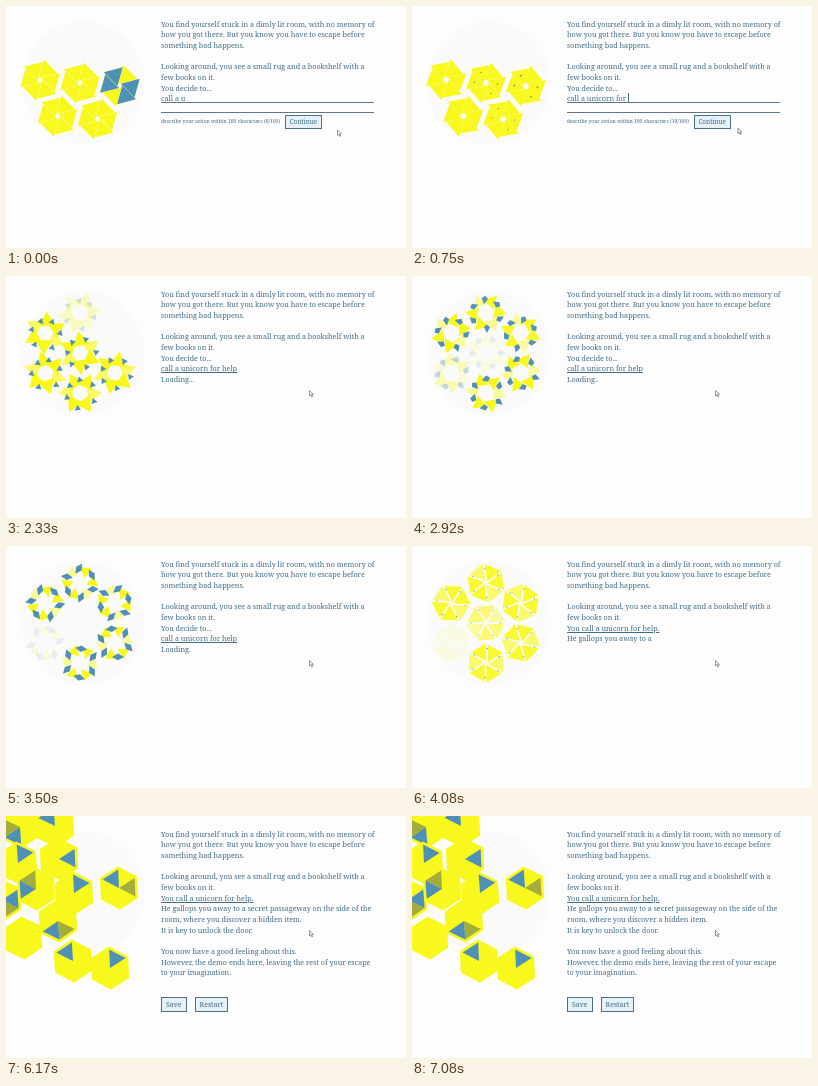
Write an HTML page with a canvas that moves like this. It is 400 px wide and 242 px high and loops after 7160 ms.

```html
<!DOCTYPE html>
<html lang="en">
<head>
<meta charset="utf-8">
<style>
html, body { margin: 0; width: 400px; height: 242px; overflow: hidden; background: #fdfdfd; }
body { position: relative; color: #3f6d88; font: 7.2px/10.65px "Noto Serif", serif; }
body > * { position: absolute; }
canvas { left: 0; top: 0; width: 400px; height: 242px; }
#story { left: 155px; top: 12.7px; white-space: pre; }
.rule { left: 155px; width: 213px; height: 1px; background: #5d7887; }
.row { left: 155px; display: flex; align-items: center; white-space: pre; }
.row span { font-size: 5px; }
.row b { box-sizing: border-box; height: 15px; padding: 0 4px; border: 1px solid #4c7084;
  background: #e5f1f6; font-weight: 400; font-size: 7px; line-height: 13px; }
#go { height: 14px; margin-left: 5px; padding: 0 3.5px; font-size: 6.4px; line-height: 12px; }
#go.over { background: #fdfdfd; }
#caret { border-left: .6px solid #3f6d88; }
</style>
</head>
<body>
<div id="story"></div>
<div class="rule form" style="top:95.5px"></div>
<div class="rule form" style="top:106px"></div>
<div class="row form" style="top:108.5px"><span id="count"></span><b id="go">Continue</b></div>
<div class="row" id="end" style="top:181px;gap:8px"><b>Save</b><b>Restart</b></div>
<canvas></canvas>
<script>
const LOOP = 7160, SENT = 1500, REPLY = 3580, BUTTONS = 6080;
const YELLOW = '#f8f81c', BLUE = '#4f90b6', OLIVE = '#a3ac3c';
const INTRO = `You find yourself stuck in a dimly lit room, with no memory of
how you got there. But you know you have to escape before
something bad happens.

Looking around, you see a small rug and a bookshelf with a
few books on it.
`;
const ACTION = 'call a unicorn for help';
const ECHO = `You ${ACTION}.`;
const ANSWER = `${ECHO}
He gallops you away to a secret passageway on the side of the
room, where you discover a hidden item.
It is key to unlock the door.

You now have a good feeling about this.
However, the demo ends here, leaving the rest of your escape
to your imagination.`;

const $ = s => document.querySelector(s);
const canvas = $('canvas'), g = canvas.getContext('2d');
const dpr = window.devicePixelRatio || 1;
canvas.width = 400 * dpr;
canvas.height = 242 * dpr;

const clamp = x => Math.max(0, Math.min(1, x));
const ease = x => x * x * (3 - 2 * x);
const mix = (a, b, k) => a + (b - a) * k;
const ramp = (t, a, b) => ease(clamp((t - a) / (b - a)));

// Value at time t on a list of [time, value] stops
function key(t, stops, curve = ease) {
  let [t0, v] = stops[0];
  for (const [t1, v1] of stops) {
    if (t < t1) return mix(v, v1, curve(clamp((t - t0) / (t1 - t0))));
    t0 = t1;
    v = v1;
  }
  return v;
}

function poly(points, color) {
  g.beginPath();
  points.forEach(p => g.lineTo(...p));
  g.closePath();
  g.fillStyle = color;
  g.fill();
}

function at(x, y, turn, scale, draw) {
  g.save();
  g.translate(x, y);
  g.rotate(turn);
  g.scale(scale, scale);
  draw();
  g.restore();
}

// Loader made of seven cells, each cut in six turning triangles
const HUB = [74, 77], R = 20, SIXTH = Math.PI / 3;
const TRI = [[-.577 * R, 0], [.289 * R, -.5 * R], [.289 * R, .5 * R]];
const RING_OUT = [[4000, 1], [4400, .12]];
const CELL_ALPHA = [
  [[2330, 1], [3100, 0], [3800, 0], [4300, 1]],
  RING_OUT,
  RING_OUT,
  [[2330, 1], [3200, .12]],
  RING_OUT,
  [[1800, 0], [2330, .25], [3000, 1], ...RING_OUT],
  [[2330, 0], [3000, 1], ...RING_OUT]
];
const TINT_PEAK = [1420, 100, 1420];

function drawLoader(t) {
  const fade = 1 - ramp(t, 4300, 4700);
  if (!fade) return;
  const phi = key(t, [[0, .07], [1420, .09], [2330, .52]]);
  const size = key(t, [[0, .97], [1420, .95], [2330, .85], [3500, .6], [4400, 1]]);
  const twist = key(t, [[0, .2], [1420, .32], [2330, .9], [3500, 1.8], [4400, 2 * SIXTH]]);
  const spread = key(t, [[0, 1.02], [1420, 1], [2330, 1.06], [3500, 1.12], [4400, 1]]);
  const pale = key(t, [[1500, 1], [3000, .45], [3800, .45], [4400, 1]]);
  const chip = key(t, [[1500, 0], [2330, 5.5], [3500, 6], [4300, 0]]);
  const tail = key(t, [[2330, 0], [3500, 1]]);
  CELL_ALPHA.forEach((stops, k) => {
    const alpha = key(t, stops) * fade;
    if (!alpha) return;
    const dist = k ? 40 : 0, dir = phi + SIXTH * (k - 1);
    const peak = TINT_PEAK[k];
    const tint = peak === undefined ? 0 : ease(clamp(1.3 - Math.abs(t - peak) / 600));
    at(HUB[0] + dist * Math.cos(dir), HUB[1] + dist * Math.sin(dir), phi + k * .3 * ramp(t, 1500, 2400), 1, () => {
      for (let i = 0; i < 6; i++) {
        g.globalAlpha = alpha * (i % 3 == 2 ? pale : 1);
        at(0, 0, i * SIXTH, 1, () => at(.577 * R * spread, 0, twist, size, () => {
          poly(TRI, YELLOW);
          if (i % 3 != 2 && tint) at(0, 0, 0, tint, () => poly(TRI, BLUE));
        }));
      }
      g.globalAlpha = alpha;
      if (chip) for (let i = 0; i < 6; i++)
        at(0, 0, (i + .5) * SIXTH, 1, () => at(.72 * R, 0, twist + i, 1, () =>
          poly([[chip, 0], [0, chip * .55], [-chip * tail, 0], [0, -chip * .55]], BLUE)));
    });
  });
}

// Honeycomb: x, y, side with a blue facet, side with an olive facet
const GEMS = [
  [68, 77, 0, -1], [14, 11, 3, 4], [49, 10, 5, -1], [12, 47, 0, -1],
  [53, 43, 1, -1], [30, 73, 4, 5], [113, 72, 5, 1], [-4, 84, 1, 2],
  [52, 105, 3, 2], [17, 122, -1, -1], [67, 145, 5, -1], [104, 152, 0, -1]
];
const corner = (j, r) => [r * Math.sin(j * SIXTH), -r * Math.cos(j * SIXTH)];

function facet(side, color, r = 18.5) {
  if (side >= 0) poly([[0, 0], corner(side, r), corner(side + 1, r)], color);
}

function drawGems(t) {
  const shown = ramp(t, 4300, 4700);
  if (!shown) return;
  const grow = ramp(t, 4830, 6050);
  GEMS.forEach(([x, y, blue, olive], i) => {
    const zoom = mix(.75, 1, grow);
    const cx = mix(HUB[0] + (x - GEMS[0][0]) * .75, x, grow);
    const cy = mix(HUB[1] + (y - GEMS[0][1]) * .75, y, grow);
    g.globalAlpha = shown * (i ? mix(.1, 1, ramp(t, 4900 + i * 50, 5350 + i * 50)) : 1);
    at(cx, cy, -.06 + .02 * Math.sin(t / 700 + i), i ? zoom : mix(.92, 1, grow), () => {
      poly([0, 1, 2, 3, 4, 5].map(j => corner(j, 21.5)), YELLOW);
      facet(olive, OLIVE);
      facet(blue, BLUE);
      if (!i && grow < 1) {
        g.globalAlpha *= 1 - grow;
        poly([[-16, 15], [20, 6], [4, 21]], BLUE);
      }
    });
  });
}

function drawPointer(t) {
  const k = ramp(t, 550, 1250);
  const over = t < SENT && k > .55;
  g.globalAlpha = 1;
  at(mix(331.5, 303.5, k), mix(124, 114.5, k), 0, 1, () => {
    const path = new Path2D(over
      ? 'M-1 0Q0-1 .8 0V3L3 3.6V7L2 8H-1L-2.6 5.2L-1 5Z'
      : 'M0 0V5.4L1.3 4.2L2.3 6.4L3.2 6L2.2 3.9H3.9Z');
    g.fillStyle = '#fff';
    g.strokeStyle = '#555';
    g.lineWidth = .6;
    g.fill(path);
    g.stroke(path);
  });
  $('#go').className = over ? 'over' : '';
}

function writeStory(t) {
  const typed = ACTION.slice(0, 8 + Math.floor(t / 65));
  let html = INTRO;
  if (t < SENT) {
    const caret = t > 60 && (t < 1000 || t % 1000 < 500);
    html += 'You decide to...\n' + typed + (caret ? '<span id="caret"></span>' : '');
    $('#count').textContent = `describe your action within 100 characters (${typed.length}/100)`;
  } else if (t < REPLY) {
    const dots = 1 + Math.floor((t - SENT) / 300) % 3;
    html += `You decide to...\n<u>${ACTION}</u>\nLoading${'.'.repeat(dots)}`;
  } else {
    const n = Math.floor(key(t, [[REPLY, 0], [3750, 27], [4500, 86], [4830, 129], [6020, ANSWER.length]], x => x));
    html += `<u>${ECHO.slice(0, n)}</u>` + ANSWER.slice(ECHO.length, Math.max(n, ECHO.length));
  }
  if (html !== writeStory.last) $('#story').innerHTML = writeStory.last = html;
  document.querySelectorAll('.form').forEach(e => e.style.visibility = t < SENT ? '' : 'hidden');
  $('#end').style.visibility = t < BUTTONS ? 'hidden' : '';
}

const start = performance.now();
function frame() {
  const t = (performance.now() - start) % LOOP;
  g.setTransform(dpr, 0, 0, dpr, 0, 0);
  g.clearRect(0, 0, 400, 242);
  g.globalAlpha = 1;
  g.beginPath();
  g.arc(77, 77, 62, 0, 7);
  g.fillStyle = 'rgba(0,0,40,.012)';
  g.fill();
  drawLoader(t);
  drawGems(t);
  drawPointer(t);
  writeStory(t);
  requestAnimationFrame(frame);
}
frame();
</script>
</body>
</html>
```
